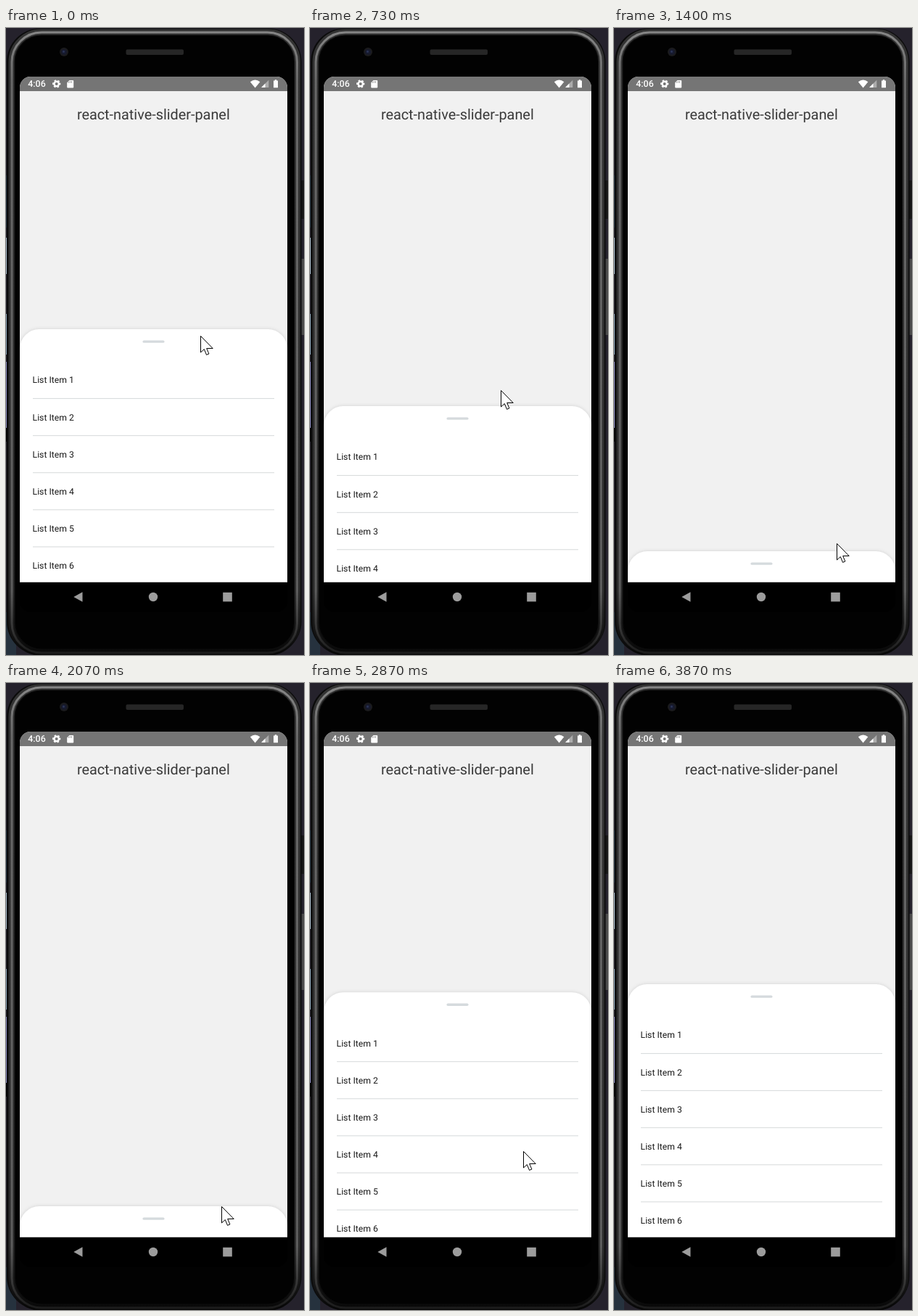
These frames come from a looping animation (411 px wide and 864 px high, 4340 ms). An HTML page:

```html
<!DOCTYPE html>
<html lang="en">
<head>
<meta charset="utf-8">
<title>Slider panel</title>
<style>
  html, body { margin: 0; width: 100%; height: 100%; overflow: hidden; background: #25222c; }
  svg { display: block; width: 100%; height: 100%; }
  text { font-family: Roboto, sans-serif; text-rendering: geometricPrecision; }
  .title { font-size: 19.85px; fill: #3a3a3a; text-anchor: middle; }
  .clock { font-size: 12.4px; font-weight: 500; fill: #fff; }
  .item { font-size: 12.2px; fill: #1a1a1a; }
  .rule { fill: #d9dcdd; }
  #sheet { filter: drop-shadow(0 0 2.5px rgba(0, 0, 0, .13)); }
</style>
</head>
<body>
<svg viewBox="0 0 411 864">
  <defs>
    <clipPath id="screen">
      <path d="M19 763.6V82a15 15 0 0 1 15-15H373a15 15 0 0 1 15 15V763.6Z"/>
    </clipPath>
    <linearGradient id="rim" x2="0" y2="1">
      <stop offset="0" stop-color="#858585"/>
      <stop offset=".08" stop-color="#686868"/>
      <stop offset=".9" stop-color="#5c5c5c"/>
      <stop offset="1" stop-color="#1c1c1c"/>
    </linearGradient>
    <linearGradient id="bevel" x2="0" y2="1">
      <stop offset="0" stop-color="#333"/>
      <stop offset=".9" stop-color="#2c2c2c"/>
      <stop offset="1" stop-color="#080808"/>
    </linearGradient>
  </defs>

  <!-- Desktop peeking out behind the phone -->
  <rect width="411" height="864" fill="#25222c"/>
  <rect y="805" width="14" height="59" fill="#26323e"/>
  <rect y="203" width="1.5" height="72" fill="#243440"/>
  <rect y="289" width="1.5" height="50" fill="#a9bccb"/>
  <rect y="394" width="1.5" height="56" fill="#8ba4b8"/>
  <rect y="460" width="1.5" height="91" fill="#8c8cc0"/>
  <rect y="551" width="1.5" height="19" fill="#000"/>

  <!-- Phone body -->
  <rect x="406" y="210" width="5" height="53" fill="#161616"/>
  <rect x="407.5" y="318" width="3.5" height="105" fill="#4a4a4a"/>
  <rect x="1" y=".5" width="406.5" height="863.5" rx="46" fill="#0b0b0b"/>
  <rect x="7.5" y="5.5" width="394.5" height="855.5" rx="41" fill="none" stroke="url(#bevel)" stroke-width="8"/>
  <rect x="8" y="6" width="393.5" height="855" rx="41" fill="none" stroke="url(#rim)" stroke-width="3"/>
  <rect x="13" y="10.5" width="384" height="845" rx="36" fill="#020202"/>
  <rect x="165.5" y="29.5" width="79.5" height="7.5" rx="2" fill="#262626"/>
  <circle cx="80" cy="33" r="6" fill="#1b1b1d"/>
  <circle cx="80" cy="33" r="3.8" fill="#171a2e"/>
  <circle cx="79.5" cy="32.5" r="1.5" fill="#2b3558"/>
  <path d="M19 764H388V790a15 15 0 0 1-15 15H34a15 15 0 0 1-15-15Z"/>
  <g fill="#9c9c9c">
    <path d="M93.3 784L105.5 777.2V790.8Z"/>
    <circle cx="203" cy="784" r="6.2"/>
    <rect x="299.2" y="777.8" width="12.6" height="12.6"/>
  </g>

  <g clip-path="url(#screen)">
    <rect x="19" y="67" width="369" height="697" fill="#f1f1f1"/>
    <rect x="19" y="67" width="369" height="20" fill="#757575"/>
    <text class="clock" x="30.3" y="81.3">4:06</text>
    <g fill="#fff">
      <circle cx="69.7" cy="77" r="3.2" fill="none" stroke="#fff" stroke-width="2.4"/>
      <circle cx="69.7" cy="77" r="4.7" fill="none" stroke="#fff" stroke-width="1.9"
              stroke-dasharray="2.6 2.322" transform="rotate(-16 69.7 77)"/>
      <path d="M87.5 72H92.2a1 1 0 0 1 1 1V81.5a1 1 0 0 1-1 1H85.2a1 1 0 0 1-1-1V75.3Z"/>
      <path d="M336.8 74.2Q343.6 68.9 350.4 74.2L343.6 82.5Z"/>
      <path d="M362.3 71.8V82H352.1Z" opacity=".4"/>
      <path d="M357.5 76.6V82H352.1Z"/>
      <path d="M370.8 71.3H373.2V72.4H375V82.3H369V72.4H370.8Z"/>
    </g>
    <path d="M86.2 73.8v2M88.4 73.2v2.4M90.5 73.2v2.4" stroke="#757575" stroke-width=".8"/>
    <text class="title" x="203.3" y="125.8">react-native-slider-panel</text>

    <g id="panel">
      <path id="sheet" d="M19 400V27a27 27 0 0 1 27-27H361a27 27 0 0 1 27 27V400Z" fill="#fff"/>
      <rect x="188.5" y="15.4" width="30" height="3.4" rx="1.6" fill="#d5dadd"/>
      <g id="list"></g>
    </g>
  </g>

  <path id="cursor" d="M.5 .5V23L5.3 18.6L8.5 26.4L11.9 25L8.7 17.5H17.2Z" fill="#fff" stroke="#000"/>
</svg>
<script>
  const LOOP = 4340, STEP = 200 / 3;
  const OPEN_Y = 415, CLOSED_Y = 721;
  const CLOSE_AT = 583.5, OPEN_AT = 2335, SLIDE = 700;
  const ROW = 51.1;

  // Pointer stops: time, x, y
  const route = [
    [267, 268, 424], [600, 263, 499], [800, 263, 499], [1000, 288, 608],
    [1333, 309, 699], [1533, 304, 731], [1733, 297, 737], [2000, 297, 737],
    [2067, 297, 721], [2200, 294, 645], [3267, 294, 645], [3800, 129, 848]
  ];

  const panel = document.getElementById('panel');
  const cursor = document.getElementById('cursor');
  const clamp = v => Math.min(1, Math.max(0, v));

  document.getElementById('list').innerHTML = Array.from({ length: 6 }, (_, i) => `
    <text class="item" x="36.6" y="${74.4 + i * ROW}">List Item ${i + 1}</text>
    <rect class="rule" x="37" y="${95 + i * ROW}" width="333" height="1.1"/>`).join('');

  function bounce(t) {
    const arc = (mid, low) => 7.5625 * (t - mid / 2.75) ** 2 + low;
    if (t < 1 / 2.75) return arc(0, 0);
    if (t < 2 / 2.75) return arc(1.5, .75);
    if (t < 2.5 / 2.75) return arc(2.25, .9375);
    return arc(2.625, .984375);
  }

  const slide = (t, start) => bounce(clamp((t - start) / SLIDE));

  function pointerAt(t) {
    const next = route.findIndex(stop => stop[0] >= t);
    if (next < 0) return route[route.length - 1].slice(1);
    if (next === 0) return route[0].slice(1);
    const [t0, x0, y0] = route[next - 1], [t1, x1, y1] = route[next];
    const p = (t - t0) / (t1 - t0);
    return [x0 + (x1 - x0) * p, y0 + (y1 - y0) * p].map(Math.round);
  }

  function draw(now) {
    const t = Math.floor((now % LOOP + 3.4) / STEP) * STEP;
    const shut = slide(t, CLOSE_AT) - slide(t, OPEN_AT);
    const y = OPEN_Y + (CLOSED_Y - OPEN_Y) * shut;
    panel.setAttribute('transform', `translate(0 ${y.toFixed(2)})`);
    cursor.setAttribute('transform', `translate(${pointerAt(t)})`);
    cursor.setAttribute('visibility', t > 3801 ? 'hidden' : 'visible');
  }

  let start;
  function tick(now) {
    start ??= now;
    draw(now - start);
    requestAnimationFrame(tick);
  }
  draw(0);
  requestAnimationFrame(tick);
</script>
</body>
</html>
```
